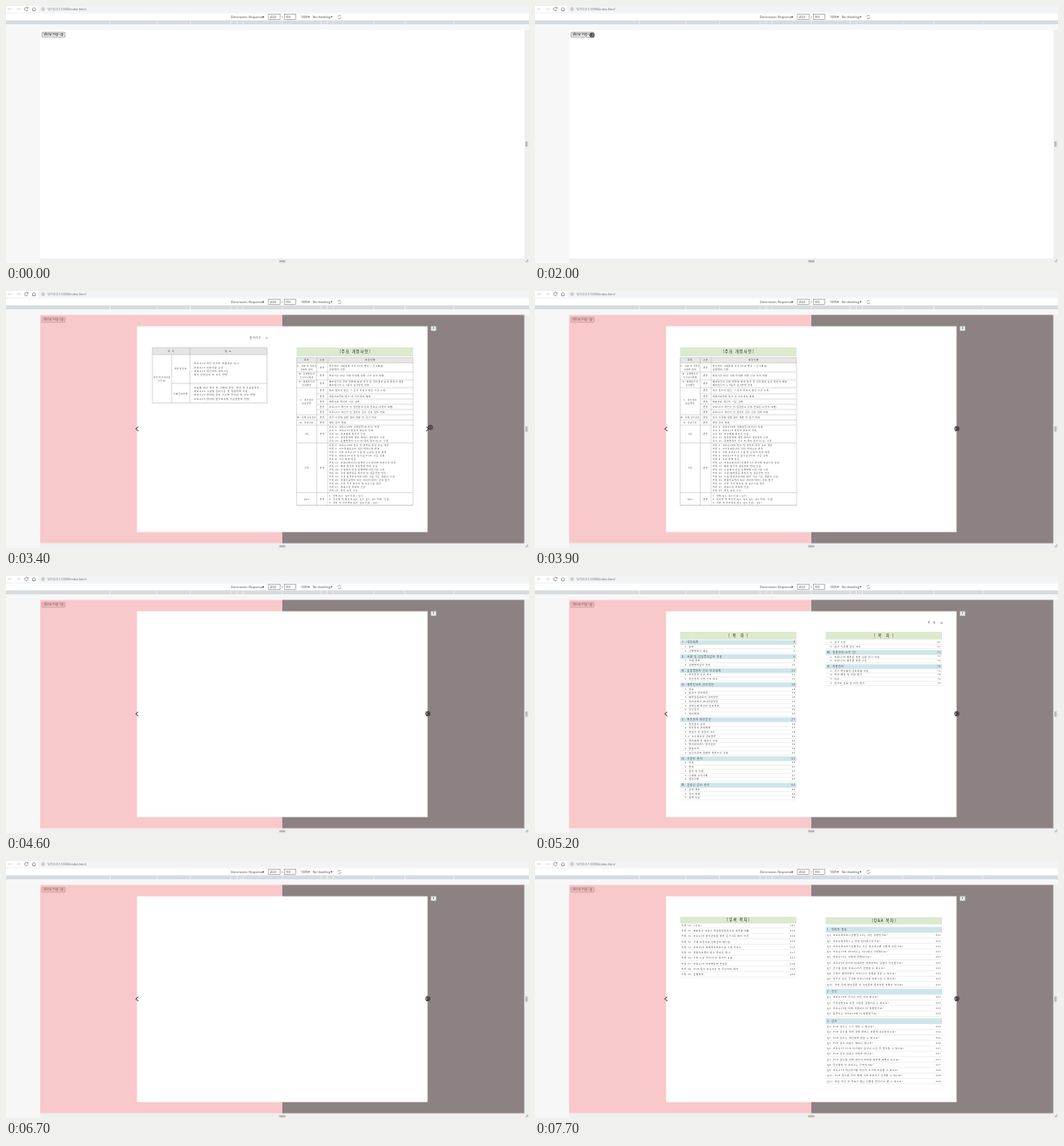
An HTML page that plays this animation: 600 by 295 pixels, repeating every 8000 ms.

```html
<!DOCTYPE html>
<html lang="ko">
<head>
<meta charset="utf-8">
<title>Pop-up booklet</title>
<style>
html, body { margin: 0; width: 100%; height: 100%; overflow: hidden; background: #f7f7f7; }
svg { display: block; width: 600px; height: 295px; }
text { font-family: "Noto Sans CJK KR", "Noto Sans CJK", "Noto Sans", sans-serif; white-space: pre; }
.ui { font-family: "Open Sans", sans-serif; }
</style>
</head>
<body>
<svg id="stage" viewBox="0 0 600 295"></svg>
<script>
const NS = 'http://www.w3.org/2000/svg';
const stage = document.getElementById('stage');
const PAGE_STEP = 167, LOOP = 8000;
const VIEW = { left: 39.2, top: 27.4, middle: 317, right: 594.6, bottom: 289.6 };
const GREEN = '#dcebce', BLUE = '#cfe5e9', RULE = '#a8a8a8';

function add(parent, tag, attrs = {}) {
  const node = document.createElementNS(NS, tag);
  for (const key in attrs) node.setAttribute(key, attrs[key]);
  parent.appendChild(node);
  return node;
}
const group = parent => add(parent, 'g');
const box = (p, x0, y0, x1, y1, fill, more) =>
  add(p, 'rect', { x: x0, y: y0, width: x1 - x0, height: y1 - y0, fill, ...more });
const line = (p, d, stroke = RULE, width = 0.4) =>
  add(p, 'path', { d, stroke, 'stroke-width': width, fill: 'none' });
// y is the vertical middle of the line
function label(p, x, y, string, size, anchor = 'start', more) {
  add(p, 'text', { x, y: y + size * 0.36, 'font-size': size, 'text-anchor': anchor,
    fill: '#444', ...more }).textContent = string;
}
// Booklet type: small glyphs set wide apart
const print = (p, x, y, string, size = 3.1, anchor, more) =>
  label(p, x, y, string, size * 0.85, anchor, { 'letter-spacing': size * 0.19, ...more });

function drawBrowser(p) {
  const ui = { class: 'ui' };
  box(p, 0, 0, 600, 295, '#f7f7f7');
  box(p, 0, 0, 600, 8, '#fff');
  box(p, 37, 0, 600, 7, '#f1f3f4');
  line(p, 'M7 3.5H2.7M4.5 1.7 2.7 3.5 4.5 5.3M12 3.5h4.3M14.5 1.7l1.8 1.8-1.8 1.8', '#c4c7c9', 0.5);
  line(p, 'M25 2.3A2 2 0 1 0 25.3 4M25.3 1.2V2.7H23.8M29.8 3.6 32 1.5l2.2 2.1M30.5 3.3V5.5H33.5V3.3', '#666', 0.6);
  add(p, 'circle', { cx: 42.5, cy: 3.5, r: 1.6, fill: 'none', stroke: '#777', 'stroke-width': 0.45 });
  line(p, 'M42.5 3.2V4.5M42.5 2.3V2.7', '#777', 0.4);
  label(p, 47, 3.5, '127.0.0.1:5500/index.html', 3.7, 'start', { ...ui, fill: '#666' });

  box(p, 0, 8, 600, 16.5, '#fff');
  line(p, 'M0 8H600', '#dadce0', 0.5);
  label(p, 258, 12.6, 'Dimensions: Responsive', 3.4, 'start', ui);
  label(p, 338, 12.6, '100%', 3.4, 'start', ui);
  label(p, 352, 12.6, 'No throttling', 3.4, 'start', ui);
  for (const x of [295, 347.5, 373.5])
    add(p, 'path', { d: `M${x - 1.1} 11.7h2.2l-1.1 1.9z`, fill: '#444' });
  for (const [x, value] of [[301, '2023'], [319.3, '955']]) {
    box(p, x, 9.6, x + 13.3, 15.5, '#fff', { stroke: '#777', 'stroke-width': 0.5 });
    label(p, x + 1.7, 12.6, value, 3.3, 'start', ui);
  }
  label(p, 316.8, 12.6, '×', 3.2, 'middle', ui);
  line(p, 'M380.7 12.2A1.8 1.8 0 0 1 384 11.6M384.3 12.9A1.8 1.8 0 0 1 381 13.6', '#666', 0.6);

  box(p, 0, 16.5, 600, 21, '#d6dbdf');
  for (const x of [119.5, 173, 211.5, 258, 265, 272, 317, 361.5, 368.5, 375.5, 422, 457.5, 514])
    line(p, `M${x} 16.5V21`, '#f2f4f5', 0.7);
  box(p, VIEW.right, VIEW.top, 600, 295, '#efefef');
  box(p, VIEW.left, VIEW.bottom, 600, 295, '#efefef');
  box(p, VIEW.left, VIEW.top, VIEW.right, VIEW.bottom, '#fff');
  line(p, 'M596.5 155.5v6M598 155.5v6M313.5 292.3h7M313.5 293.7h7M596 294l3-3M597.7 294.2l1.5-1.5', '#777', 0.6);

  box(p, 41.3, 30.2, 67.7, 35.8, '#efefef', { stroke: '#666', 'stroke-width': 0.5, rx: 0.6 });
  label(p, 54.5, 33, 'Show Pop-up', 3.7, 'middle', { fill: '#111', 'font-family': 'Liberation Sans, sans-serif' });
}

function titleBar(p, string, y0 = 64.6, y1 = 72.3) {
  box(p, 166.4, y0, 300, y1, GREEN);
  line(p, `M166.4 ${y0}H300M166.4 ${y1}H300`, '#b9c9ac', 0.35);
  print(p, 233.5, (y0 + y1) / 2, string, 5, 'middle', { 'font-weight': 500, fill: '#222' });
}
function bar(p, y, string, number, half = 2.7) {
  box(p, 166.4, y - half, 300, y + half, BLUE);
  print(p, 168, y, string, 3.4, 'start', { 'font-weight': 500 });
  if (number) print(p, 298.8, y, number, 3.4, 'end');
}
function entry(p, x, y, string, number, half) {
  print(p, x, y, string, 3.05);
  print(p, 298.8, y, number, 3, 'end');
  line(p, `M166.4 ${y + half}H300`, '#d4d4d4', 0.35);
}

function guidePage(p) {
  print(p, 301.5, 54, '들어가기 - ⅱ', 3.5, 'end');
  box(p, 168, 65, 299.5, 73, '#e6e6e6');
  line(p, 'M168 65H299.5V128.5H168ZM168 73H299.5M190 106H299.5M190 73V128.5M211 65V128.5', RULE, 0.45);
  print(p, 189.5, 69, '목 차', 3.3, 'middle');
  print(p, 255, 69, '필 요', 3.3, 'middle');
  print(p, 179, 99, '확진자(조사대상', 2.7, 'middle');
  print(p, 179, 103, '유증상)', 2.7, 'middle');
  print(p, 200.5, 89.5, '확진자관리', 3, 'middle');
  print(p, 200.5, 118, '사례관리방법', 2.9, 'middle');
  ['- 코로나19 확진 이후의 생활관리 조사', '- 코로나19 입원치료 순서', '- 코로나19 확진자의 격리기준', '- 확진 판정이후 및 조사 방법']
    .forEach((s, i) => print(p, 213, 83.5 + i * 4.3, s));
  ['- 지표별 대상 확인 및 사례의 확인, 일정 및 진료담당자', '- 코로나19 시설별 관리기준 및 생활방역 지침', '- 코로나19 환자의 접촉 기간의 증상과 및 조사 방법', '- 코로나19 환자의 업무복귀의 기준방안의 방법']
    .forEach((s, i) => print(p, 213, 110.7 + i * 4.3, s));
}

function revisionPage(p) {
  titleBar(p, '[주요 개정사항]', 65.2, 74.5);
  box(p, 166.5, 76.5, 300, 82.5, '#e6e6e6');
  print(p, 178, 79.5, '목차', 3.2, 'middle');
  print(p, 195.8, 79.5, '구분', 3.2, 'middle');
  print(p, 251, 79.5, '개정사항', 3.2, 'middle');
  const rows = [
    [93, 'Ⅱ. 사례 및 검역단/사례의 정의', '확진환자 사례정의 추가(PCR 병상 + 신속항원)/감염병의 유형'],
    [102, 'Ⅲ. 감염병환자/신고보고체계', '의료기관 대상 사례 안내에 대한 신고 보고 체계'],
    [111, 'Ⅳ. 해외입국자/관리방안', '해외입국자 관리 변경에 따라 입국 전 검사결과 음성 확인서 제출/해외입국자 6-7일차 검사방법 변경'],
    [118, '', '격리 통지서 발급 → 문자 격리서 발급 기관 주체'],
    [124, '', '생활치료센터 입소 후 자가격리 해제'],
    [130, '', '외래진료 확진자 기준 설명'],
    [136, '', '코로나19 확진자 및 밀접접촉 관리 안내문(사망자 포함)'],
    [142, '', '코로나19 확진자 전 접촉자 검사 관리 절차 안내'],
    [148, 'Ⅶ. 검체 검사관리', '전국 기관별 실험 결과 제출 및 검사 의뢰'],
    [154, 'Ⅸ. 자원관리', '재택 관리 체계'],
    [174.5, '서식', '서식 2. 코로나19의 사례분류(조사서) 삭제/서식 4. 코로나19 확진자 보호자 삭제/서식 10. 격리해제 확인서 신설/서식 13. 입원환자에 대한 격리자 정보통지 수정/서식 15. 감염병환자 신고 및 격리 통지서(구) 수정'],
    [231.5, '부록', '부록 2. 코로나19의 임상 및 역학적 특성 주요 개정/부록 3. 자가격리대상자 관련 방역수칙 변경/부록 4. 관리 코로나19 시설 및 근로자 관리 제정/부록 5. 코로나19 진단 검사실(PCR) 기준 강화/부록 8. 소독 방역 전문/부록 12. 코로나바이러스감염증-19 환자의 의료기관 관리/부록 13. 해외 입국자 격리면제 안내 신설/부록 18. 시설에서 진단 감염병별 다중시설 수칙/부록 20. 국내 예방접종 확인자 및 접종증명 인정/부록 22. 시설 환경보호자에 대한 시설 기준 생활관 신설/부록 25. 생활치료센터 대상 격리자(환자) 관리 업무/부록 26. 기타 국가 확진자 및 집단시설 관리/부록 27. 의료기관 격리의 신설/부록 29. 확진 이후 기준'],
    [246, 'Q&A', '1. 정의(Q1, Q2(신설), Q3)/2. 증상의 및 확진자(Q3, Q4, Q5, Q6 삭제, 신설)/3. 격리 및 자가격리(Q2, Q5(신설), Q6)']
  ];
  let top = 82.5;
  for (const [bottom, name, body] of rows) {
    const stack = (x, string, size, anchor) => {
      const lines = string.split('/');
      const pitch = Math.min(4, (bottom - top) / lines.length);
      lines.forEach((s, i) =>
        print(p, x, (top + bottom) / 2 + (i - (lines.length - 1) / 2) * pitch, s, size, anchor));
    };
    stack(178, name, 2.7, 'middle');
    print(p, 195.8, (top + bottom) / 2, '변경', 2.9, 'middle');
    stack(203.7, body, 2.95);
    const merged = bottom > 111 && bottom < 142;
    line(p, `M${merged ? 189.5 : 166.5} ${bottom}H300`);
    top = bottom;
  }
  print(p, 178, 125, 'Ⅴ. 확진환자', 2.8, 'middle');
  print(p, 178, 129, '대응방안', 2.8, 'middle');
  line(p, 'M166.5 76.5H300V246H166.5ZM166.5 82.5H300M189.5 76.5V246M202 76.5V246');
}

// Entries are "text|page"; a leading # marks a section bar.
function contentsPage(p, y, list) {
  titleBar(p, '[ 목  차 ]');
  for (const row of list.split('\n')) {
    const [string, number] = row.split('|');
    if (string[0] === '#') {
      y += 6.7;
      bar(p, y, string.slice(1), number);
    } else {
      y += 4.76;
      entry(p, 172, y, string, number, 2.4);
    }
  }
}
const contents = `#Ⅰ. 대응체계|3
1. 총칙|3
2. 감염병위기 대응|4
#Ⅱ. 사례 및 감염병의심자 정의|6
1. 사례 정의|6
2. 감염병의심자 정의|10
#Ⅲ. 감염병환자 신고·보고체계|11
1. 확진환자 신고·보고|11
2. 확진환자 사망 신고·보고|12
#Ⅳ. 해외입국자 관리방안|14
1. 개요|14
2. 입국자 관리방안|15
3. 예방접종완료자 관리방안|19
4. 격리면제자 모니터링방안|20
5. 검역단계 확진자 관리방안|22
6. 진단검사|25
7. 격리해제|26
#Ⅴ. 확진환자 대응방안|27
1. 확진환자 관리|28
2. 확진환자 격리해제|37
3. 확진자 및 밀접자 조사|38
3-1. 조사대상자 관리방안|40
4. 격리해제 전·재검사 지침|43
5. 변이바이러스 환자관리|46
6. 병원조치|48
7. 집단자료와 감염병 역학조사 강화|50
#Ⅵ. 사망자 관리|53
1. 목적|53
2. 원칙|53
3. 절차 및 지원|54
4. 단계별 조치사항|57
5. 행정사항|60
#Ⅶ. 실험실 검사 관리|63
1. 검체 채취|63
2. 검사 의뢰|65
3. 검체 운송|66`;
const contentsTail = `4. 검사 기관|67
5. 검사 기관별 검사 보고|67
#Ⅷ. 환경관리(소독 등)|71
1. 코로나19 예방을 위한 실내 환기 지침|71
2. 코로나19 예방을 위한 소독|72
#Ⅸ. 자원관리|73
1. 국가 병상배정 관리체계 지침|73
2. 병상 배정 및 전원 업무|75
3. 이송|76
4. 환자의 진료 및 지정 업무|79`;

function listPage(p, title, rows, y = 73.8) {
  titleBar(p, title, 64.6, 71.2);
  rows.forEach(([string, number], i) => entry(p, 168, y + i * 6.26, string, number, 3.1));
}
const subjects = ['코로나19 확진환자', '해외입국자', '자가격리 대상자', '감염병의심자', '의료기관 및 시설', '예방접종 완료자', '생활치료센터'];
const matters = ['관리 업무 절차', '조사서 및 신고서', '격리 통지서 안내', '검체 채취와 검사 의뢰 방법', '사례별 대응 요령'];
const numbered = (name, count, page, step) => Array.from({ length: count }, (_, i) =>
  [`${name} ${i + 1}. ${subjects[i * 3 % 7]} ${matters[i * 2 % 5]}`, page + Math.floor(i * step)]);

const appendix = `<서식>|197
해외입국 코로나 격리입원통지자료 세부별 현황|204
코로나19 환자관리를 위한 동거가족 해지 지정|208
국내 다중이용 방역관리 매뉴얼|209
코로나19 재택격리의료시설 시행 가이드|214
생활치료센터 퇴소 안내문 제시|217
기타 시설 확진자 및 종사자 교육|221
코로나19 격리병동의 안내문|226
PCR 검사 의심조건 및 증상자의 체크|230
감염병의|236`.split('\n').map((row, i) => {
  const [string, number] = row.split('|');
  return [`부록 ${30 + i}. ${string}`, number];
});

function questionPage(p) {
  titleBar(p, '[Q&A 목차]', 65, 72.3);
  const sections = [
    ['1. 역학적 정보', '코로나바이러스감염증-19는 어떤 질병인가요?/코로나바이러스는 어떤 바이러스인가요?/코로나바이러스감염증은 기존 바이러스와 어떻게 다른가요?/코로나19의 바이러스는 어디에서 유행했나요?/코로나19는 어떻게 전염되나요?/코로나19 환자와 대화하면 현재까지도 감염이 가능한가요?/공기를 통해 코로나19가 전염될 수 있나요?/신체가 매개하면서 코로나19 전체를 막을 수 있나요?/모기가 같은 공간에 코로나19를 전파시킬 수 있나요?/격리 중에 애완동물 및 주민들과 접촉하면 위험이 있나요?'],
    ['2. 증상', '코로나19의 증상은 어떤 것이 있나요?/무증상환자도 다른 사람을 감염시킬 수 있나요?/코로나19에 의해 자율적이 더 위험한가요?/흡연자는 코로나19에 더 위험한가요?'],
    ['3. 검사', 'PCR 검사는 누가 받을 수 있나요?/PCR 검사를 위한 검체 채취는 어떻게 이루어지나요?/PCR 검사는 개인에게 받을 수 있나요?/PCR 검사 비용은 얼마나 됩니까?/코로나19 PCR 검사에서 음성이 나온 뒤 양성일 수 있나요?/PCR 검사 비용은 어떻게 하나요?/PCR 검사를 위해 본인이 의뢰를 원하면 보험이 되나요?/증상발현 및 보호구는 무엇인가요?/코로나19 의심환자를 확진자 조사에 이용할 수 있나요?/PCR 검사를 격리 해제 시에 보호자가 진행할 수 있나요?/재검 확진 후 치료가 없는 감염을 양성으로 볼 수 있나요?']
  ];
  let y = 79;
  sections.forEach(([name, body], s) => {
    const questions = body.split('/');
    bar(p, y, name, '', 3.3);
    questions.forEach((string, i) =>
      entry(p, 168, y + 6.4 + i * 6.25, `Q${i + 1}. ${string}`, 252 + s * 2 + (i >> 2), 3.1));
    y += 6.4 + (questions.length - 1) * 6.25 + 8.5;
  });
}

const painters = [
  guidePage,
  revisionPage,
  () => {},
  p => contentsPage(p, 69.6, contents),
  p => {
    print(p, 301.5, 54, '목  차 - ⅲ', 3.5, 'end');
    contentsPage(p, 71.6, contentsTail);
  },
  p => listPage(p, '[표 목차]', numbered('표', 20, 5, 3.4)),
  p => listPage(p, '[서식 목차]', numbered('서식', 29, 83, 1.7)),
  p => listPage(p, '[부록 목차]', numbered('부록', 29, 133, 2.2), 76.4),
  p => listPage(p, '[부록 목차]', appendix),
  questionPage
];

drawBrowser(group(stage));

const popup = group(stage);
box(popup, VIEW.left, VIEW.top, VIEW.middle, VIEW.bottom, '#f39195', { 'fill-opacity': 0.5 });
box(popup, VIEW.middle, VIEW.top, VIEW.right, VIEW.bottom, '#1d0707', { 'fill-opacity': 0.5 });
box(popup, 150.3, 40.5, 483.6, 276.7, '#fff');
box(popup, 487.3, 40.3, 493.7, 45.8, '#f3f3f3', { stroke: '#777', 'stroke-width': 0.4, rx: 0.5 });
label(popup, 490.5, 43, 'x', 3.8, 'middle');
const pages = painters.map(paint => {
  const page = group(popup);
  paint(page);
  return page;
});
line(popup, 'M151.6 155.8 149.1 158.3 151.6 160.8M482.4 155.8 484.9 158.3 482.4 160.8', '#111', 1);

const cursor = add(stage, 'circle', { r: 2.7, fill: '#333', 'fill-opacity': 0.6, stroke: '#222', 'stroke-opacity': 0.6, 'stroke-width': 0.6 });

// [start, left page index]; -1 is an empty spread
const spreads = [[2300, 0], [3800, -1], [3900, 1], [4600, -1], [4700, 2], [5200, 3], [5700, -1], [5800, 4],
  [6200, -1], [6300, 5], [6700, -1], [6800, 6], [7100, -1], [7200, 7], [7700, 8]];
// [start, x, y]; without a position the pointer is hidden
const pointer = [[0], [700, 135.5, 291.5], [800, 120.5, 240], [1200], [1600, 72.5, 28.5], [1700, 70, 30],
  [1800, 67.5, 32], [1900, 66, 33], [2000, 65.5, 33.5], [2600], [2800, 456.5, 126.5], [2900, 466.5, 130.8],
  [3000], [3200, 489, 155.5], [3400, 487, 156.5], [3500, 485.5, 157.3], [3600, 484, 158]];
const latest = (steps, time) => steps.filter(step => step[0] <= time).pop();

function render(time) {
  const spread = latest(spreads, time);
  popup.style.display = spread ? '' : 'none';
  const left = spread ? spread[1] : -1;
  pages.forEach((page, i) => {
    const side = i - left;
    const shown = left >= 0 && (side === 0 || side === 1);
    page.style.display = shown ? '' : 'none';
    if (shown) page.setAttribute('transform', `translate(${side * PAGE_STEP} 0)`);
  });
  const [, x, y] = latest(pointer, time);
  cursor.style.display = x === undefined ? 'none' : '';
  if (x !== undefined) {
    cursor.setAttribute('cx', x);
    cursor.setAttribute('cy', y);
  }
}

const start = performance.now();
function tick() {
  render((performance.now() - start) % LOOP);
  requestAnimationFrame(tick);
}
render(0);
requestAnimationFrame(tick);
</script>
</body>
</html>
```
